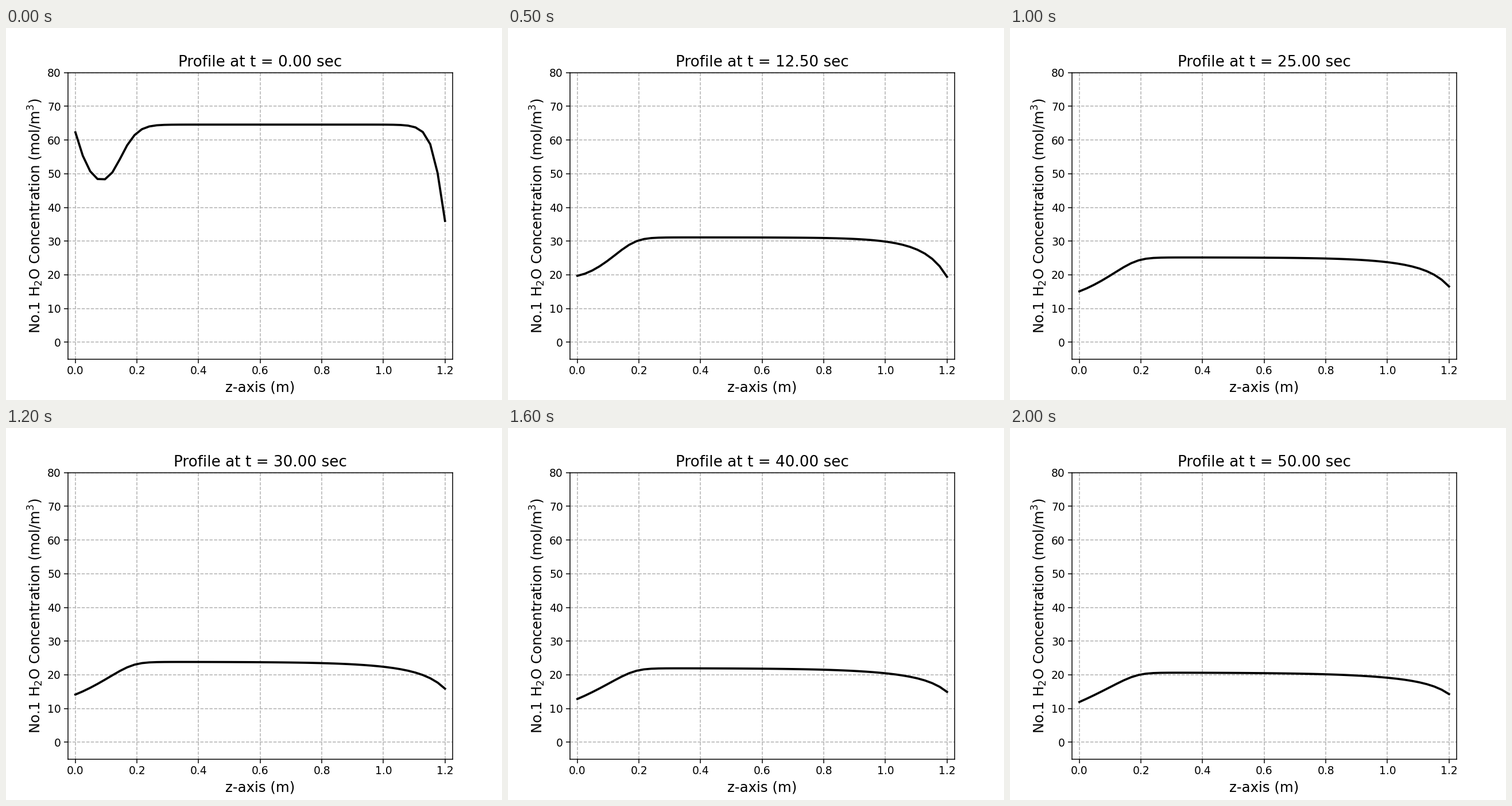
Write a matplotlib script that moves like this. It is 864 px wide and 648 px high and loops after 2.1 s.

```python
import numpy as np
import matplotlib.pyplot as plt
from matplotlib.animation import FuncAnimation

FRAMES, INTERVAL, STEP = 21, 100, 2.5
CELLS = 50
KEY_T = np.array([0, 7.5, 17.5, 50])

cell = np.arange(CELLS + 1)
z = 1.2 * cell / CELLS


def keyed(t, *values):
    """Smooth cubic through values at KEY_T, in logarithmic time."""
    fit = np.polyfit(np.log(KEY_T + 2), values, 3)
    return np.polyval(fit, np.log(t + 2))


def inlet_drop(t):
    """Rounded ramp near z = 0, partly filled by a bump at the wall."""
    ramp = 0.0585 * np.log1p(np.exp(7.75 - cell))
    power = 2.5 - 0.45 * np.exp(-t / 2)
    bump = np.clip(1 - cell / 6, 0, 1) ** power
    return (keyed(t, 1.43, 1.10, 1.045, 0.99) * ramp
            - keyed(t, 0.613, 0.169, 0.089, 0.027) * bump)


def outlet_drop(t):
    """Fast and slow exponential tails; the slow one spreads as sqrt(t)."""
    k = cell[::-1]
    total = keyed(t, 0.4425, 0.397, 0.360, 0.309)
    fast = 0.125 - 0.0006 * t - 0.382 * np.exp(-t / 1.5)
    fast_rate = 0.5 + 1.5 * np.exp(-t / 3)
    reach = 1 + 0.95 * np.sqrt(t)
    return fast * np.exp(-fast_rate * k) + (total - fast) * np.exp(-k / reach)


def profile(t):
    plateau = np.exp(keyed(t, *np.log([64.58, 36.26, 28.05, 20.67])))
    return plateau * (1 - inlet_drop(t) - outlet_drop(t))


plt.rcParams["font.family"] = "DejaVu Sans"
fig, ax = plt.subplots(figsize=(6.4, 4.8), dpi=135)
line, = ax.plot(z, profile(0), "k-", lw=2)
title = ax.set_title("", fontsize=14)
ax.set_xlabel("z-axis (m)", fontsize=13)
ax.set_ylabel("No.1 H$_2$O Concentration (mol/m$^3$)", fontsize=13, labelpad=2.6)
ax.tick_params(axis="x", pad=2.7)
ax.tick_params(axis="y", pad=3.0)
ax.set_xlim(-0.024, 1.224)
ax.set_ylim(-5, 80)
ax.grid(linestyle="--")


def update(i):
    t = i * STEP
    line.set_ydata(profile(t))
    title.set_text(f"Profile at t = {t:.2f} sec")
    return line, title


anim = FuncAnimation(fig, update, frames=FRAMES, interval=INTERVAL,
                     repeat=True, repeat_delay=0)
plt.show()
```
